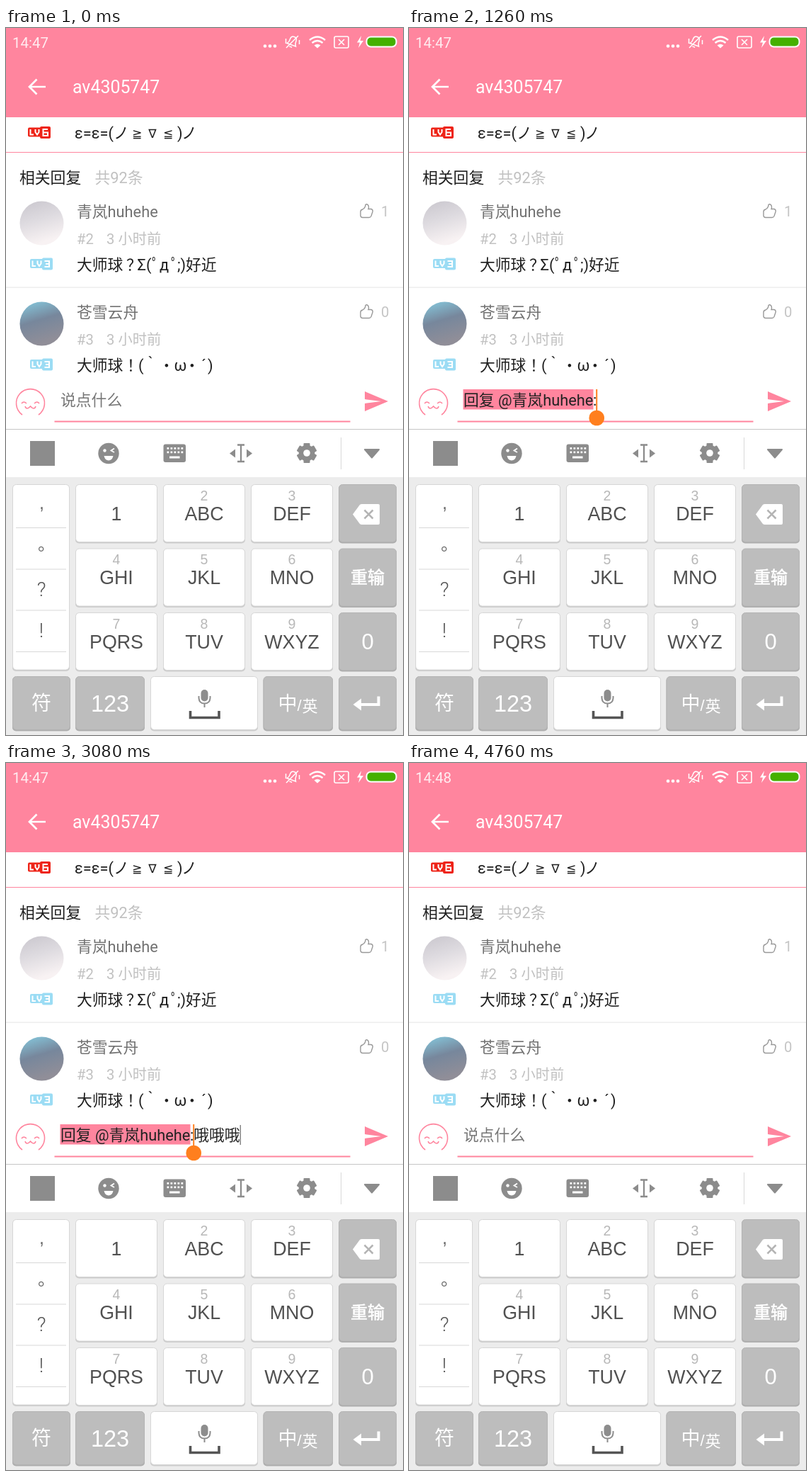
Animation of 561x998 px, one loop 5040 ms. Source, as an HTML page:

```html
<!DOCTYPE html>
<html lang="zh-CN">
<head>
<meta charset="utf-8">
<title>Reply box</title>
<style>
html, body { margin: 0; width: 100%; height: 100%; overflow: hidden; background: #fff; }
svg { display: block; width: 100vw; height: 100vh; font-family: Roboto, 'Noto Sans CJK SC', 'Noto Sans CJK', sans-serif; }
.arial { font-family: 'Liberation Sans', 'Noto Sans CJK SC', sans-serif; }
.math { font-family: 'DejaVu Sans', sans-serif; }
</style>
</head>
<body>
<svg id="stage" viewBox="0 0 561 998" xml:space="preserve"></svg>
<script>
const PINK = '#ff859e', INK = '#1f1f1f', NAME = '#727272', PALE = '#c1c1c1', ICON = '#8c8c8c', ORANGE = '#ff7f1e';
const BODY = 21.8;
const USERS = ['青岚huhehe', '苍雪云舟'];

const text = (x, y, size, fill, str, extra = '') =>
  `<text x="${x}" y="${y}" font-size="${size}" fill="${fill}" ${extra}>${str}</text>`;
const mid = (x, y, size, fill, str, extra = '') => text(x, y, size, fill, str, 'text-anchor="middle" ' + extra);
const rect = (x, y, w, h, fill, extra = '') =>
  `<rect x="${x}" y="${y}" width="${w}" height="${h}" fill="${fill}" ${extra}/>`;
const disc = (x, y, r, fill, extra = '') => `<circle cx="${x}" cy="${y}" r="${r}" fill="${fill}" ${extra}/>`;
const fill = (d, color, extra = '') => `<path d="${d}" fill="${color}" ${extra}/>`;
const line = (d, color, w = 1, extra = '') => `<path d="${d}" fill="none" stroke="${color}" stroke-width="${w}" ${extra}/>`;
const group = (id, body, extra = '') => `<g id="${id}" ${extra}>${body}</g>`;
const spans = list => list.map(([x, s]) => `<tspan x="${x}">${s}</tspan>`).join('');

function badge(x, y, color, six) {
  const digit = six ? 'M28 4H21.500V13H28V8.500H22' : 'M20.500 4.500H27V12.500H20.500M22 8.500H27';
  return `<g transform="translate(${x} ${y})">` +
    rect(0, 1.5, 20, 13, color, 'rx="2"') + rect(17, 0, 15, 17, color, 'rx="2"') +
    line('M3.500 4V11.500H8M10.500 4V8L13 11.500L15.500 8V4', '#fff', 2) +
    line(digit, '#fff', 2) + '</g>';
}

function statusBar() {
  const w = '#fff';
  return rect(0, 0, 561, 126, PINK) +
    text(9, 28, 20.5, w, '14:47', 'id="clock" opacity=".85"') +
    [366, 373, 380].map(x => disc(x, 25.5, 2.3, w)).join('') +
    line('M398.500 24Q401 21 400.500 17Q400.500 12 405 12Q409.500 12 409.500 17Q409 21 411.500 24ZM403 27H407', w, 1.5, 'transform="rotate(20 405 19)"') +
    line('M413 11L396 28M395.500 15V22M414.500 17V23', w, 1.5) +
    line('M429 17Q440 8 451 17M432.500 21Q440 15 447.500 21', w, 2.4) +
    fill('M435.500 24.500Q440 21 444.500 24.500L440 28.500Z', w) +
    line('M466 12H482Q484 12 484 14V26Q484 28 482 28H466Q464 28 464 26V14Q464 12 466 12ZM470 16L478 24M478 16L470 24', w, 1.6) +
    fill('M502 11L496 20.500H500L498 28L505 18H500.500Z', w) +
    rect(509.5, 12.5, 42, 14, '#45b000', 'rx="6" stroke="#fff" stroke-width="2"') +
    line('M56 83H33M43.500 72.500L33 83L43.500 93.500', w, 2.7) +
    text(94, 92, 24.9, w, 'av4305747');
}

function reply(y, user, floor, likes, tone, content) {
  return `<g transform="translate(0 ${y})">` +
    disc(50.5, 50, 31, `url(#${tone})`) +
    text(100, 41.5, BODY, NAME, user) +
    text(100, 79.5, 20.25, PALE, `#${floor}`) + text(142, 79.5, 20.25, PALE, '3 小时前') +
    badge(34, 99, '#9bdcf4') +
    text(100, 116.5, BODY, INK, spans(content)) +
    line('M501 34Q501 31 504 30.500Q508 28 508 24Q510 22 512 25Q513 28 512 30H516Q519 31 518 34L516 40Q515 42 513 42H504Q501 42 501 39Z', '#999', 1.4) +
    text(530, 40.5, 20.25, '#c4c4c4', likes) +
    rect(0, 140, 561, 1.2, '#e9e9e9') + '</g>';
}

function inputBar() {
  return rect(0, 497, 561, 70, '#fff') +
    line('M23 546A20 20 0 1 1 46 546M22 530Q25 526 29 530M40 530Q44 526 47 530M27 534Q29 540 34.500 534Q40 540 42 534', PINK, 1.6) +
    rect(68.5, 554.5, 418, 2, PINK) +
    fill('M507 513L540 527L507 541V530L530 527L507 524Z', PINK) +
    text(77, 532.5, BODY, '#777', '说点什么', 'id="hint"') +
    group('draft', rect(76.5, 510, 184, 28.5, PINK) +
      text(77, 532.5, BODY, '#222', `回复 @${USERS[0]}`) +
      text(260, 532.5, BODY, '#222', '', 'id="typed"')) +
    rect(0, 511, 1.3, 28, '#777', 'id="caret"') +
    group('handle', rect(264.2, 510, 2, 34, ORANGE) + disc(265.2, 550.5, 10.8, ORANGE)) +
    group('popup', rect(-2, 527, 54.5, 42, '#fff', 'stroke="#ccc" id="popBox"') + text(11, 557, 27, '#555', '', 'id="spell"'));
}

function toolbar() {
  const keys = [];
  for (let r = 0; r < 2; r++) for (let c = 0; c < 5; c++) keys.push(rect(227.5 + c * 5, 592 + r * 5.5, 2.7, 2.7, '#fff'));
  let teeth = '';
  for (let a = 0; a < 360; a += 60) teeth += rect(420.5, 586, 9, 10, ICON, `rx="1" transform="rotate(${a} 425 600)"`);
  return rect(34, 583, 35, 35, ICON) +
    disc(145, 600.5, 14.7, ICON) + disc(139.5, 596.5, 2.2, '#fff') +
    line('M153 593.500L148.500 596.500L153 599', '#fff', 1.8) + fill('M138.500 604H151.500Q150 610.500 145 610.500Q140 610.500 138.500 604Z', '#fff') +
    rect(222.5, 587.5, 31.5, 25.5, ICON, 'rx="3"') + keys.join('') + rect(231, 604.5, 14.5, 3, '#fff') +
    line('M327 588.500H337M332 588.500V612M327 612H337', ICON, 2.3) +
    fill('M316 600.500L324 594.500V606.500ZM348 600.500L340 594.500V606.500Z', ICON) +
    teeth + disc(425, 600, 11.3, ICON) + disc(425, 600, 4.8, '#fff') +
    fill('M507 595H527L517 606.500Z', ICON, `stroke="${ICON}" stroke-width="2" stroke-linejoin="round"`);
}

function key(x, y, w, h, gray, id = '') {
  return rect(x, y + 1.5, w, h, gray ? '#adadad' : '#cdcdcd', 'rx="5"') +
    rect(x + .5, y + .5, w - 1, h - 1, gray ? '#bdbdbd' : '#fff', `rx="5" stroke="${gray ? '#b4b4b4' : '#d6d6d6'}" ${id && `id="${id}"`}`);
}

function keyboard() {
  const cols = [98, 222, 346], rows = [644, 734.5, 825];
  const labels = ['1', 'ABC', 'DEF', 'GHI', 'JKL', 'MNO', 'PQRS', 'TUV', 'WXYZ'];
  let out = rect(0, 634, 561, 364, '#ececec') + key(9, 644, 81, 262.5);
  out += [705, 763.5, 821.5, 880].map(y => rect(14, y, 71, 1, '#d8d8d8')).join('') + group('side', '');
  labels.forEach((label, i) => {
    const x = cols[i % 3], y = rows[i / 3 | 0], top = Math.floor(y);
    out += key(x, y, 116, 82, false, 'key' + label);
    if (i) out += mid(x + 58, top + 23, 19.5, '#b8b8b8', i + 1, `class="arial" id="num${label}"`);
    out += mid(x + 58, top + 51, 26.8, '#505050', label, 'class="arial"');
  });
  out += key(470, 644, 82, 82, true, 'erase') + key(470, 734.5, 82, 82, true) + key(470, 825, 82, 82, true);
  [[9, 82], [98, 98], [204, 152], [363.5, 98.5], [470, 82]].forEach(([x, w], i) => out += key(x, 915, w, 76, i !== 2));
  return out +
    fill('M490 686.500L500 673Q501 672 503 672H526Q528 672 528 674V699Q528 701 526 701H503Q501 701 500 700Z', '#fff') +
    line('M506.500 680.500L518.500 692.500M518.500 680.500L506.500 692.500', '#b4b4b4', 2.6) +
    mid(511, 784, 24, '#fff', '重输', 'stroke="#fff" stroke-width=".6"') +
    mid(511, 877, 31, '#fff', '0', 'class="arial"') +
    mid(50, 963, 28, '#fff', '符') + mid(147, 965, 32.5, '#fff', '123', 'class="arial"') +
    text(384.5, 963, 27, '#fff', '中') + text(411.5, 964, 22, '#fff', '/', 'class="arial"') + text(418.5, 964.5, 22, '#fff', '英') +
    rect(275.5, 934, 10, 16.5, '#8d8d8d', 'rx="5"') + line('M272.500 943V946Q273 953.500 280.500 953.500Q288 953.500 288.500 946V943M280.500 953.500V959', '#8d8d8d', 2) +
    line('M260.500 964V973.500H301V964', '#555', 3.6) +
    line('M526.500 943.500V955H498', '#fff', 4) + fill('M490.500 955L502 946.500V963.500Z', '#fff');
}

const stage = document.getElementById('stage');
stage.innerHTML = `<defs>
  <linearGradient id="mist" x2=".3" y2="1"><stop stop-color="#c9c6cd"/><stop offset=".5" stop-color="#dedbe0"/><stop offset="1" stop-color="#f8f2f3"/></linearGradient>
  <linearGradient id="dusk" x2=".3" y2="1"><stop stop-color="#86cbe0"/><stop offset=".5" stop-color="#77879c"/><stop offset="1" stop-color="#908e98"/></linearGradient>
  <clipPath id="strip"><rect y="567" width="473" height="67"/></clipPath></defs>` +
  rect(0, 0, 561, 998, '#fff') + statusBar() + badge(31, 139, '#ee2418', true) +
  text(97, 156, BODY, INK, spans([[97, 'ε=ε=('], [152, 'ノ'], [242, ')'], [248, 'ノ']])) +
  ['≧', '∇', '≦'].map((s, i) => mid(185 + i * 22, 155, 17, INK, s, 'class="math"')).join('') +
  rect(0, 175, 561, 1, PINK) +
  text(19, 219, BODY, INK, '相关回复') + text(125.5, 219, BODY, PALE, '共92条') +
  rect(0, 232, 561, 134, '#f0f0f0', 'id="touch"') +
  reply(225.5, USERS[0], 2, 1, 'mist', [[100, '大师球'], [170, '？'], [185.5, 'Σ('], [206, 'ﾟ'], [217, 'д'], [233, 'ﾟ'], [242, ';)'], [254, '好近']]) +
  reply(367.5, USERS[1], 3, 0, 'dusk', [[100, '大师球'], [171, '！'], [187, '('], [194, '｀'], [216, '・'], [237.5, 'ω'], [252, '・'], [276, '´'], [285, ')']]) +
  inputBar() + rect(0, 567, 561, 68, '#fff') + rect(0, 566, 561, 1, '#c6c6c6') + rect(473, 578, 1, 45, '#d9d9d9') +
  group('tools', toolbar()) + group('words', '', 'clip-path="url(#strip)"') +
  group('more', line('M511 589.500L523 601L511 612.500', ICON, 3)) +
  group('close', disc(517, 600.500, 14.3, ICON) + line('M511.500 595L522.500 606M522.500 595L511.500 606', '#fff', 3)) +
  keyboard();

const SIDES = {
  marks: ['，', '。', '?', '!'],
  one: ['o', 'm', 'n', '!'],
  two: ['mo', 'o', 'm', 'n']
};
const WORDS = {
  none: [],
  one: [[26, '哦'], [102, '(⊙o⊙)哦'], [279.5, '你'], [345.5, '噢'], [411, '呢']],
  two: [[26, 'on'], [108, '哦哦'], [208, '摸'], [273.5, '莫'], [340, '噢噢'], [438.5, 'no']],
  three: [[26, '哦哦哦'], [174, '哦哦'], [273.5, '摸'], [340, '噢噢'], [438.5, '你']],
  next: [[26, '莫'], [103, '哦哦']]
};
const START = { clock: '14:47', touch: 0, typed: null, caret: 0, handle: 0, side: 'marks', words: 'none', spell: '', press: 0, erase: 0 };

// Each step changes only the listed parts of the state.
const STEPS = [
  [140, { touch: 1 }],
  [280, { touch: 0 }],
  [420, { typed: ':', caret: 1 }],
  [980, { caret: 0 }],
  [1260, { handle: 1 }],
  [1820, { words: 'one', side: 'one', press: 1 }],
  [1960, { spell: 'o', press: 0 }],
  [2240, { words: 'two', side: 'two', press: 1 }],
  [2380, { spell: 'on' }],
  [2520, { press: 0 }],
  [2660, { words: 'three', press: 1 }],
  [2800, { spell: 'ooo', press: 0 }],
  [2940, { words: 'none', side: 'marks', spell: '', typed: ':哦哦哦', caret: 1 }],
  [3360, { caret: 0 }],
  [3500, { caret: 1 }],
  [3640, { handle: 0 }],
  [3920, { typed: ':哦哦', erase: 1 }],
  [4060, { clock: '14:48', erase: 0 }],
  [4200, { typed: ':哦', words: 'next', erase: 1 }],
  [4340, { typed: ':', words: 'none' }],
  [4480, { typed: '' }],
  [4620, { typed: null, caret: 0 }],
  [4760, { erase: 0 }]
];

const $ = id => document.getElementById(id);
const show = (id, on) => $(id).style.display = on ? '' : 'none';

function sideItem(str, i) {
  const y = 683 + i * 58.2;
  if (str === '，') return mid(50.5, 679, 25, '#666', ',', 'class="arial"');
  if (str === '。') return text(45, 737, 24, '#666', str);
  if (str === '?' || str === '!') return mid(50, y + 2.5, 28, '#555', str, 'font-weight="300"');
  return mid(49.5, y, 19.5, '#555', str, 'font-weight="300"');
}

function draw(s) {
  $('clock').textContent = s.clock;
  show('touch', s.touch);
  show('hint', s.typed === null);
  show('draft', s.typed !== null);
  $('typed').textContent = s.typed || '';
  const glyphs = [...(s.typed || '')];
  $('caret').setAttribute('x', 260 + glyphs.reduce((w, g) => w + (g === ':' ? 5.2 : BODY), 0));
  show('caret', s.caret);
  show('handle', s.handle);
  show('popup', s.spell);
  $('spell').textContent = s.spell;
  $('popBox').setAttribute('width', 24.5 + s.spell.length * 15);
  const idle = s.words === 'none', next = s.words === 'next';
  show('tools', idle);
  show('more', !idle && !next);
  show('close', next);
  $('words').innerHTML = WORDS[s.words].map(([x, w], i) =>
    text(x, 613.5, 33, i || next ? '#555' : '#ff8a50', w)).join('');
  $('side').innerHTML = SIDES[s.side].map(sideItem).join('');
  $('keyMNO').setAttribute('fill', s.press ? '#f5f5f5' : '#fff');
  $('numMNO').setAttribute('fill', s.press ? '#777' : '#b8b8b8');
  $('erase').setAttribute('fill', s.erase ? '#a6a6a6' : '#bdbdbd');
}

let shown = -1;
function tick() {
  const t = performance.now() % 5040;
  const count = STEPS.filter(([at]) => at <= t).length;
  if (count !== shown) {
    shown = count;
    draw(Object.assign({}, START, ...STEPS.slice(0, count).map(step => step[1])));
  }
  requestAnimationFrame(tick);
}
tick();
</script>
</body>
</html>
```
